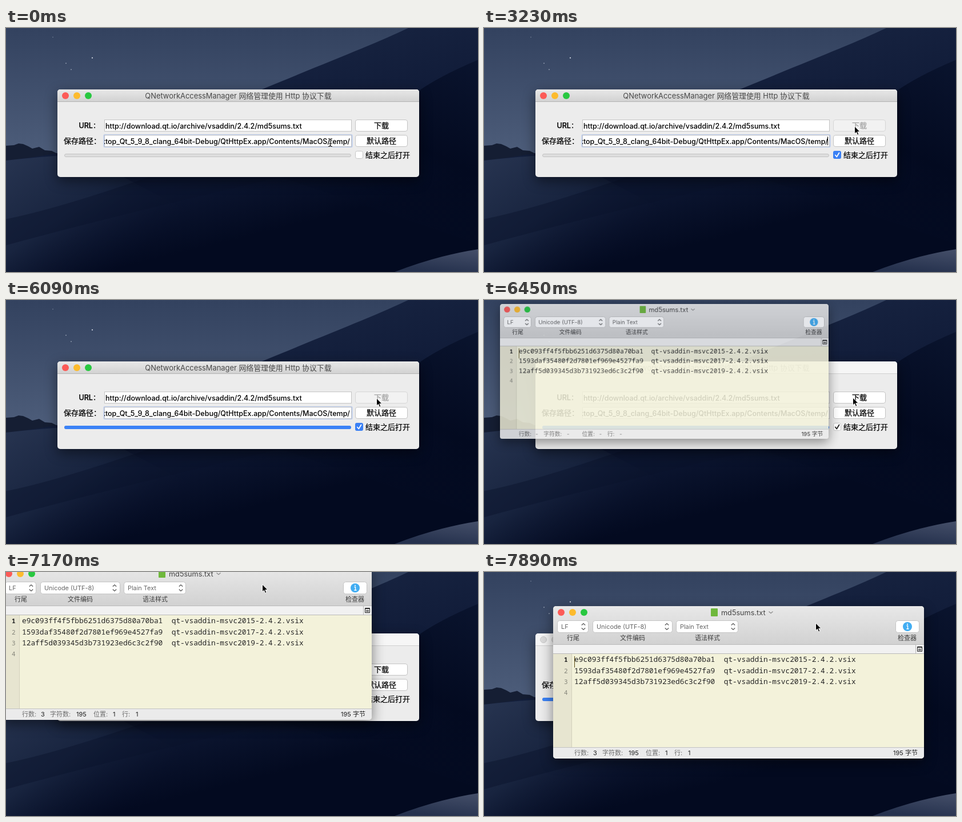
These frames come from a looping animation (826 by 429 pixels, 8 s). An HTML page:

```html
<!DOCTYPE html>
<html lang="zh-CN">
<head>
<meta charset="utf-8">
<title>Download dialog</title>
<style>
html, body { margin: 0; width: 100%; height: 100%; overflow: hidden; background: #060e26; }
svg { display: block; }
text { font: 12.5px Inter, "Noto Sans CJK SC", "Noto Sans CJK", sans-serif; white-space: pre; }
.label { font-weight: 500; stroke: #000; stroke-width: .25; }
.field { font-weight: 500; }
.title { font-size: 12.9px; }
.small { font-size: 10.9px; fill: #666; }
.caption { font-size: 11px; fill: #3c3c3c; text-anchor: middle; }
.status { font-size: 11px; fill: #6d6d6d; }
.status .value { fill: #1e1e1e; }
.code { font: 12.83px "Noto Sans Mono", "DejaVu Sans Mono", monospace; fill: #262626; }
.nums { font: 11px "Noto Sans Mono", monospace; fill: #85857a; text-anchor: end; }
.mid { text-anchor: middle; }
.end { text-anchor: end; }
.ctl { fill: #fff; stroke: #c4c4c4; }
.line { fill: none; stroke: #555; stroke-width: 1.2; }
.win { filter: drop-shadow(0 7px 11px rgba(0, 0, 0, .48)); }

.anim { animation: 8s step-end infinite; }
.ibeam { animation-name: ibeam; }
.arrow { animation-name: arrow; }
.caret { animation-name: caret; }
.check { animation-name: check; }
.full { animation-name: full; }
.active { animation-name: active; }
.idle { animation-name: idle; }
.btn { animation-name: btn; }
.btn-text { animation-name: btn-text; }
.editor { animation-name: editor; }
.edit-caret { animation-name: edit-caret; }
.pending { animation-name: pending; }
.ready { animation-name: ready; }

@keyframes ibeam { 0% { opacity: 1 } 4.5%, 100% { opacity: 0 } }
@keyframes arrow {
  0% { transform: translate(-40px, -40px) }
  4.5% { transform: translate(611px, 218px) }
  9% { transform: translate(626px, 221px) }
  13.375% { transform: translate(625px, 223px) }
  17.875% { transform: translate(647px, 176px) }
  22.375% { transform: translate(648px, 172px) }
  80.625% { transform: translate(645px, 171px) }
  85.125% { transform: translate(473px, 38px) }
  89.625% { transform: translate(448px, 21px) }
  94.125% { transform: translate(562px, 78px) }
  98.625%, 100% { transform: translate(580px, 89px) }
}
@keyframes caret {
  0%, 9%, 22.375%, 35.875%, 49.25%, 62.75%, 71.625%, 100% { opacity: 0 }
  4.5%, 17.875%, 31.375%, 40.375%, 53.75%, 67.25% { opacity: 1 }
}
@keyframes check { 0% { opacity: 0 } 13.375%, 100% { opacity: 1 } }
@keyframes full { 0% { opacity: 0 } 76.125%, 100% { opacity: 1 } }
@keyframes active { 0% { opacity: 1 } 80.625%, 100% { opacity: 0 } }
@keyframes idle { 0% { opacity: 0 } 80.625%, 100% { opacity: 1 } }
@keyframes btn {
  0%, 80.625%, 100% { fill: #fff; stroke: #c4c4c4 }
  26.875% { fill: #2f74ee; stroke: #2565d8 }
  31.375% { fill: #f2f2f2; stroke: #d6d6d6 }
}
@keyframes btn-text {
  0%, 80.625%, 100% { fill: #000; stroke: #000 }
  26.875% { fill: #fff; stroke: #fff }
  31.375% { fill: #a3a3a3; stroke: #a3a3a3 }
}
@keyframes editor {
  0% { opacity: 0; transform: translate(28px, 7px) scale(.886) }
  80.625% { opacity: .87; transform: translate(28px, 7px) scale(.886) }
  85.125% { opacity: 1; transform: translate(-9px, -8px) }
  94.125% { opacity: 1; transform: translate(103px, 49px) }
  98.625%, 100% { opacity: 1; transform: translate(121px, 60px) }
}
@keyframes edit-caret { 0%, 98.625%, 100% { opacity: 1 } 89.625% { opacity: 0 } }
@keyframes pending { 0% { opacity: 1 } 85.125%, 100% { opacity: 0 } }
@keyframes ready { 0% { opacity: 0 } 85.125%, 100% { opacity: 1 } }
</style>
</head>
<body>
<svg width="826" height="429" viewBox="0 0 826 429">
  <defs>
    <linearGradient id="sky" x2="0" y2="1">
      <stop stop-color="#33425f"/><stop offset=".5" stop-color="#4c5c79"/>
    </linearGradient>
    <linearGradient id="dune" gradientUnits="userSpaceOnUse" x1="620" y1="20" x2="690" y2="300">
      <stop stop-color="#16223f"/><stop offset=".45" stop-color="#101b38"/><stop offset="1" stop-color="#030a20"/>
    </linearGradient>
    <linearGradient id="slope" gradientUnits="userSpaceOnUse" x1="20" y1="225" x2="170" y2="440">
      <stop stop-color="#26334f"/><stop offset=".5" stop-color="#18243f"/><stop offset="1" stop-color="#081029" stop-opacity="0"/>
    </linearGradient>
    <linearGradient id="shade" x1="1" y1="0" x2=".5" y2="1">
      <stop stop-color="#0a142e"/><stop offset=".5" stop-color="#030a20"/><stop offset="1" stop-color="#040c24" stop-opacity="0"/>
    </linearGradient>
    <linearGradient id="crest" x1="1" y1="0" x2=".6" y2="1">
      <stop stop-color="#454f69"/><stop offset="1" stop-color="#26324e"/>
    </linearGradient>
    <linearGradient id="bar" x2="0" y2="1">
      <stop stop-color="#e8e8e8"/><stop offset="1" stop-color="#d1d1d1"/>
    </linearGradient>
    <g id="lights">
      <circle r="6" fill="#fc5b57"/><circle cx="20" r="6" fill="#fdbb2d"/><circle cx="40" r="6" fill="#28c840"/>
    </g>
    <path id="step" class="line" d="M-3.2-2.5 0-5.5 3.2-2.5M-3.2 2.5 0 5.5 3.2 2.5"/>
    <clipPath id="frame"><rect width="649" height="268" rx="5"/></clipPath>
    <clipPath id="path-box"><rect x="172" y="188" width="432" height="21"/></clipPath>
  </defs>

  <!-- desktop -->
  <rect width="826" height="429" fill="url(#sky)"/>
  <g fill="#dfe5f0">
    <circle cx="151" cy="52.5" r="1.1"/><circle cx="114" cy="73" r=".7"/><circle cx="105" cy="62" r=".7"/><circle cx="82" cy="16" r=".5"/>
  </g>
  <path d="M0 207 14 206 22 203 30 204 39 208 46 212 58 209 68 215 80 216 92 222V250H0z" fill="#151e33"/>
  <path d="M704 0C650 26 570 57 450 107S190 212 0 233V429H826V0z" fill="url(#dune)"/>
  <path d="M0 233Q60 226 130 222L520 429H0z" fill="url(#slope)"/>
  <path d="M0 336Q90 318 250 262H480Q190 330 0 382z" fill="#0a132b" opacity=".45"/>
  <path d="M826 56Q760 84 723 110T480 262L826 380z" fill="url(#shade)"/>
  <path d="M826 389Q755 400 680 429H826z" fill="url(#crest)"/>

  <!-- download dialog -->
  <g class="win">
    <rect x="90" y="108" width="633" height="154" rx="5" fill="#ececec"/>
    <path d="M90 130V113a5 5 0 0 1 5-5H718a5 5 0 0 1 5 5V130z" fill="#f6f6f6"/>
    <path d="M90 129.5H723" stroke="#d0d0d0"/>
    <g class="anim idle">
      <g fill="#dcdcdc" stroke="#c8c8c8">
        <circle cx="104" cy="119" r="5.5"/><circle cx="124" cy="119" r="5.5"/><circle cx="144" cy="119" r="5.5"/>
      </g>
      <text class="title mid" x="406.5" y="124" fill="#a8a8a8">QNetworkAccessManager 网络管理使用 Http 协议下载</text>
    </g>
    <g class="anim active">
      <path d="M90 130V113a5 5 0 0 1 5-5H718a5 5 0 0 1 5 5V130z" fill="url(#bar)"/>
      <path d="M90 129.5H723" stroke="#b4b4b4"/>
      <use href="#lights" x="104" y="119"/>
      <text class="title mid" x="406.5" y="124" fill="#484848">QNetworkAccessManager 网络管理使用 Http 协议下载</text>
    </g>

    <text class="label" x="127.5" y="176">URL：</text>
    <text class="label" x="101" y="203" style="font-size:13px">保存路径：</text>
    <rect class="ctl" x="172.5" y="161.5" width="432" height="20"/>
    <text class="field" x="174" y="177">http://download.qt.io/archive/vsaddin/2.4.2/md5sums.txt</text>
    <rect class="anim active" x="170.5" y="187" width="436" height="23" rx="2" fill="#b9cbee"/>
    <rect class="ctl" x="172.5" y="188.5" width="432" height="20"/>
    <g clip-path="url(#path-box)">
      <text class="field end" x="602" y="204">Desktop_Qt_5_9_8_clang_64bit-Debug/QtHttpEx.app/Contents/MacOS/temp/</text>
    </g>
    <rect class="anim caret" x="601" y="191" width="1" height="15"/>

    <rect class="anim btn" x="611.5" y="161.5" width="91" height="20" rx="3.5"/>
    <text class="label mid anim btn-text" x="657" y="176" style="font-size:13px">下载</text>
    <rect class="ctl" x="611.5" y="188.5" width="91" height="20" rx="3.5"/>
    <text class="label mid" x="657" y="203" style="font-size:13px">默认路径</text>

    <rect x="102.5" y="221.5" width="501" height="5" rx="2.5" fill="#dedede" stroke="#c3c3c3"/>
    <rect class="anim full" x="102" y="221" width="502" height="6" rx="3" fill="#3b82f6"/>
    <rect class="ctl" x="611.5" y="216.5" width="13" height="13" rx="3"/>
    <g class="anim check" fill="none" stroke-width="1.8" stroke-linecap="round" stroke-linejoin="round">
      <path d="M614.8 223.5 617.3 226.5 621.5 219.5" stroke="#222"/>
      <g class="anim active">
        <rect x="611" y="216" width="14" height="14" rx="3" fill="#3a80f5"/>
        <path d="M614.8 223.5 617.3 226.5 621.5 219.5" stroke="#fff"/>
      </g>
    </g>
    <text class="label" x="629" y="228" style="font-size:13px">结束之后打开</text>
  </g>

  <!-- text editor -->
  <g class="win anim editor">
    <g clip-path="url(#frame)">
      <rect width="649" height="268" fill="#f3f2da"/>
      <rect width="649" height="68" fill="url(#bar)"/>
      <rect y="67" width="649" height="17" fill="#f1f1f1"/>
      <path d="M0 67.5H649M0 83.5H649M634.5 68V83" stroke="#b9b9b9"/>
      <rect y="84" width="32" height="164" fill="#e7e5d0"/>
      <path d="M32.5 84V248" stroke="#d3d1bd"/>
      <rect y="248" width="649" height="20" fill="#ebebeb"/>
      <path d="M0 248.5H649" stroke="#c2c2c2"/>
    </g>
    <use href="#lights" x="14" y="11"/>
    <rect x="276" y="4" width="12" height="14" rx="1" fill="#6fb83c"/>
    <text x="294" y="16" fill="#444" style="font-size:12.7px">md5sums.txt</text>
    <path d="M377.5 9.5 381 12.5 384.5 9.5" class="line" style="stroke:#8a8a8a"/>

    <rect class="ctl" x="7.5" y="25.5" width="54" height="21" rx="4"/>
    <rect class="ctl" x="69.5" y="25.5" width="139" height="21" rx="4"/>
    <rect class="ctl" x="215.5" y="25.5" width="108" height="21" rx="4"/>
    <rect class="ctl" x="599.5" y="25.5" width="41" height="21" rx="4"/>
    <use href="#step" x="53" y="36"/><use href="#step" x="199" y="36"/><use href="#step" x="315" y="36"/>
    <text class="small" x="14" y="40">LF</text>
    <text class="small" x="76" y="40">Unicode (UTF-8)</text>
    <text class="small" x="222" y="40">Plain Text</text>
    <circle cx="620" cy="36" r="8" fill="#42adf2"/>
    <path d="M618.5 34.5H620.5V40M618.3 40H622.5" fill="none" stroke="#fff" stroke-width="1.4"/>
    <circle cx="620" cy="31.8" r="1.1" fill="#fff"/>
    <text class="caption" x="35" y="60">行尾</text>
    <text class="caption" x="139" y="60">文件编码</text>
    <text class="caption" x="270" y="60">语法样式</text>
    <text class="caption" x="619.5" y="60">检查器</text>
    <path d="M637.5 71.5H645.5V79.5H637.5zM637.5 72.5H645.5M639 75.5H644M639 77.5H644" fill="none" stroke="#222"/>

    <text class="nums" x="25.5" y="98" style="fill:#222;font-weight:600">1</text>
    <text class="nums" x="25.5" y="117.5">2</text>
    <text class="nums" x="25.5" y="137">3</text>
    <text class="nums" x="25.5" y="156">4</text>
    <text class="code" x="37" y="98">e9c093ff4f5fbb6251d6375d80a70ba1  qt-vsaddin-msvc2015-2.4.2.vsix</text>
    <text class="code" x="37" y="117.5">1593daf35480f2d7801ef969e4527fa9  qt-vsaddin-msvc2017-2.4.2.vsix</text>
    <text class="code" x="37" y="137">12aff5d039345d3b731923ed6c3c2f90  qt-vsaddin-msvc2019-2.4.2.vsix</text>
    <rect class="anim edit-caret" x="37" y="88" width="1" height="20" fill="#5a4a14"/>

    <g class="status">
      <text class="status" x="37" y="262">行数:</text>
      <text class="status" x="86" y="262">字符数:</text>
      <text class="status" x="162" y="262">位置:</text>
      <text class="status" x="212" y="262">行:</text>
      <g class="anim pending">
        <text class="status" x="70" y="262">-</text>
        <text class="status" x="132" y="262">-</text>
        <text class="status" x="196" y="262">-</text>
        <text class="status" x="236" y="262">-</text>
      </g>
      <g class="anim ready">
        <text class="status value" x="70" y="262">3</text>
        <text class="status value" x="132" y="262">195</text>
        <text class="status value" x="196" y="262">1</text>
        <text class="status value" x="236" y="262">1</text>
      </g>
      <text class="status value end" x="638" y="262">195 字节</text>
    </g>
  </g>

  <!-- pointers -->
  <g class="anim ibeam" fill="none">
    <path id="beam" d="M564 194.5Q567 194.5 567.5 196.5 568 194.5 571 194.5M567.5 196V207M564 208.5Q567 208.5 567.5 206.5 568 208.5 571 208.5M565.5 203.5H569.5" stroke="#fff" stroke-width="2.6"/>
    <use href="#beam"/>
    <path d="M564 194.5Q567 194.5 567.5 196.5 568 194.5 571 194.5M567.5 196V207M564 208.5Q567 208.5 567.5 206.5 568 208.5 571 208.5M565.5 203.5H569.5" stroke="#111" stroke-width="1.2"/>
  </g>
  <path class="anim arrow" d="M.5.8V14L3.5 11.2 5.6 16.2 7.9 15.2 5.8 10.4H10z" fill="#000" stroke="#fff" stroke-width="1" stroke-linejoin="round"/>
</svg>
</body>
</html>
```
